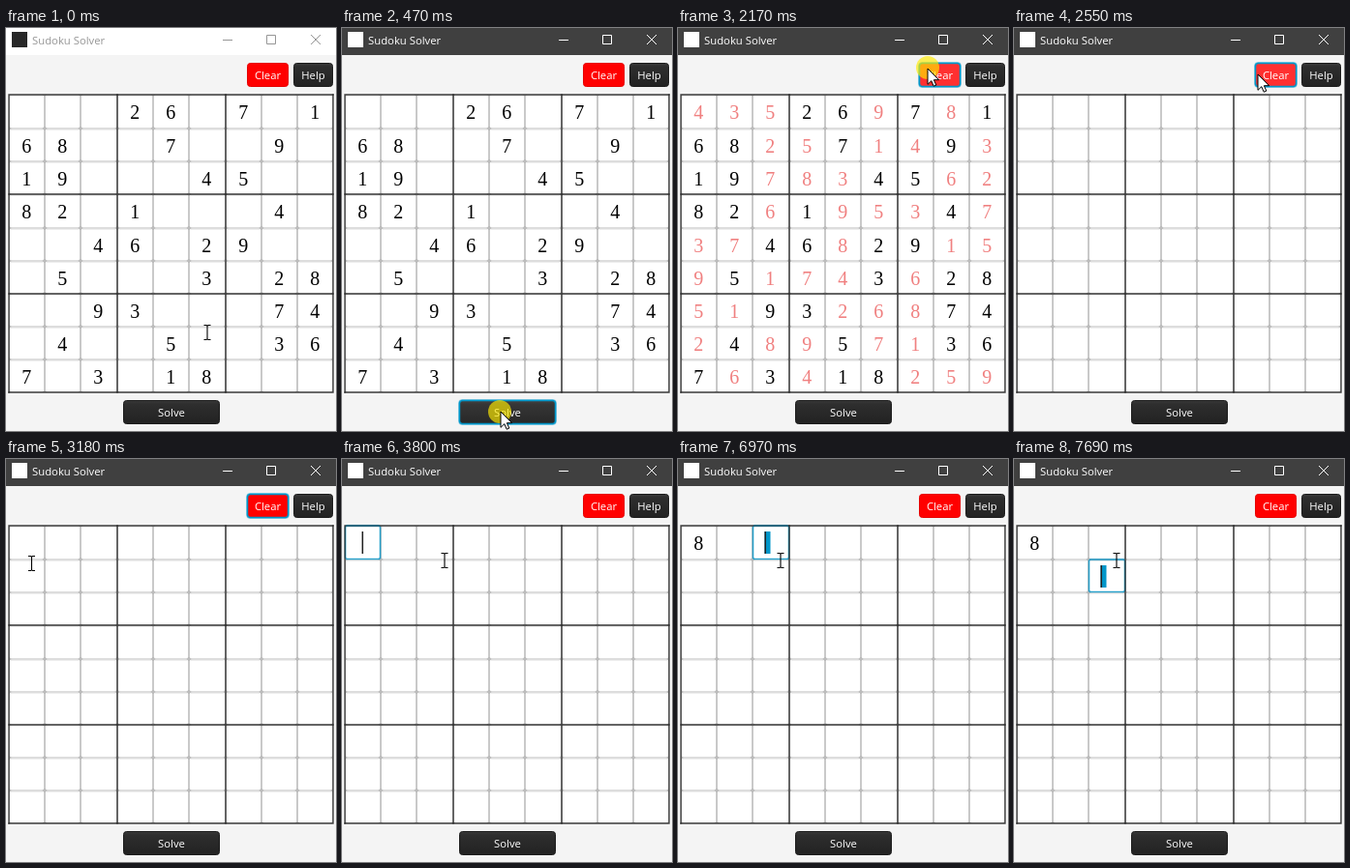
Recreate the animation shown at these times as an HTML page. Size 341 by 417 pixels, loop 8 s.

```html
<!DOCTYPE html>
<html lang="en">
<head>
<meta charset="utf-8">
<title>Sudoku Solver</title>
<style>
  html, body { margin: 0; width: 100%; height: 100%; overflow: hidden; background: #f4f4f4; }
  svg { display: block; width: 341px; height: 417px; }
  text { font: 11.3px "Open Sans", "Noto Sans", sans-serif; }
  .mid { text-anchor: middle; }
  .digit { font: 20px "Liberation Serif", serif; text-anchor: middle; }
</style>
</head>
<body>
<svg id="stage" viewBox="0 0 341 417" xmlns="http://www.w3.org/2000/svg">
  <defs>
    <linearGradient id="dark" x2="0" y2="1">
      <stop offset="0" stop-color="#3a3a3a"/><stop offset=".15" stop-color="#2e2e2e"/><stop offset="1" stop-color="#222"/>
    </linearGradient>
    <linearGradient id="lit" x2="0" y2="1">
      <stop offset="0" stop-color="#444"/><stop offset=".15" stop-color="#363636"/><stop offset="1" stop-color="#282828"/>
    </linearGradient>
  </defs>
</svg>
<script>
const LOOP = 8000, TICK = 77.5;
const COLS = [3, 40, 77, 115, 152, 189, 227, 264, 301, 338];
const ROWS = [69, 104, 138, 172, 207, 241, 275, 309, 343, 377];
const GIVEN = "...26.7.168..7..9.19...45..82.1...4...46.29...5...3.28..93...74.4..5..367.3.18...";
const SOLVED = "435269781682571493197834562826195347374682915951743628519326874248957136763418259";

// Pointer path: tick, x, y
const PATH = [
  [0, 208, 315], [1, 190, 352], [2, 164, 397], [13, 164, 397], [14, 167, 378], [15, 170, 358],
  [16, 176, 318], [18, 205, 205], [20, 242, 95], [22, 258, 42], [31, 258, 42], [33, 252, 48],
  [34, 222, 58], [36, 105, 92], [38, 27, 113], [39, 27, 113], [43, 26, 103], [47, 26, 103], [49, 106, 105]
];
// Button presses: start, end, x, y
const PRESSES = [[300, 700, 163, 397], [2170, 2400, 258, 41], [3500, 3650, 26, 101]];
// Focused cell: time, column, row
const FOCUS = [[3500, 0, 0], [6040, 1, 0], [6970, 2, 0], [7140, 0, 1], [7290, 1, 1], [7690, 2, 1]];
// Visible caret: start, end, offset from the cell's left line
const CARETS = [
  [3500, 4030, 18], [4490, 4970, 18], [5120, 5580, 13], [5810, 6040, 23],
  [6040, 6590, 13], [6970, LOOP, 13]
];

const stage = document.getElementById("stage");

function add(tag, attrs, parent = stage, text) {
  const el = document.createElementNS("http://www.w3.org/2000/svg", tag);
  set(el, attrs);
  if (text) el.textContent = text;
  parent.appendChild(el);
  return el;
}
function set(el, attrs) {
  for (const key in attrs) el.setAttribute(key, attrs[key]);
}
const show = (el, on) => set(el, { visibility: on ? "visible" : "hidden" });
const within = (t, a, b) => t >= a && t < b;
const mix = (a, b, p) => a + (b - a) * p;
const grey = v => `rgb(${v},${v},${v})`;

// Title bar
add("rect", { width: 341, height: 417, fill: "#f4f4f4" });
const bar = add("rect", { width: 341, height: 28 });
const icon = add("rect", { x: 6, y: 4, width: 16, height: 16 });
const title = add("text", { x: 27, y: 17 }, stage, "Sudoku Solver");
const controls = add("path", {
  d: "M224 12.5h10M269.5 7.5h9v9h-9zM315 7l10 10M325 7l-10 10", fill: "none", "stroke-width": 1
});

function makeButton(x, y, w, label, fill, hover) {
  const halo = add("rect", {
    x: x - .5, y: y - .5, width: w + 1, height: 26, rx: 3.5, fill: "none",
    stroke: "#0096c9", "stroke-width": 1, opacity: .45
  });
  const body = add("rect", { x: x + .5, y: y + .5, width: w - 1, height: 24, rx: 3 });
  add("text", { x: x + w / 2, y: y + 17, fill: "#fff", class: "mid" }, stage, label);
  return (focused, over) => {
    show(halo, focused);
    set(body, {
      fill: over ? hover : fill,
      stroke: focused ? "#0096c9" : fill === "#f00" ? "#e60000" : "#1c1c1c",
      "stroke-width": focused ? 1.5 : 1
    });
  };
}
const clear = makeButton(249, 36, 43, "Clear", "#f00", "#ff3030");
const help = makeButton(297, 36, 41, "Help", "url(#dark)", "url(#lit)");
const solve = makeButton(121, 385, 100, "Solve", "url(#dark)", "url(#lit)");
help(false, false);

// Board
add("rect", { x: 3, y: 69, width: 335, height: 308, fill: "#bcbcbc" });
for (let i = 0; i < 81; i++) {
  const x = COLS[i % 9], y = ROWS[i / 9 | 0];
  const w = COLS[i % 9 + 1] - x, h = ROWS[(i / 9 | 0) + 1] - y;
  add("rect", { x: x + .8, y: y + .5, width: w - 1.6, height: h - 1, rx: 2, fill: "#fff" });
  add("rect", { x: x + 2, y: y + 1, width: w - 4, height: 1, fill: "#eee" });
}
const ring = add("g", { fill: "none", stroke: "#0a96c8" });
const glow = add("rect", { "stroke-width": 2.4, opacity: .25, rx: 2 }, ring);
const edge = add("rect", { "stroke-width": 1.2, opacity: .8, rx: 2 }, ring);
for (const i of [0, 3, 6, 9]) {
  add("path", {
    d: `M${COLS[i]} 68.3V377.7M2.3 ${ROWS[i]}H338.7`, stroke: "#222", "stroke-width": 1.4, opacity: .85
  });
}
const topEdge = add("path", { stroke: "#0a86b4", "stroke-width": 1.2, opacity: .7 });

const block = add("rect", { width: 6, height: 23, fill: "#0096c9" });
const givens = add("g", { fill: "#000" });
const answers = add("g", { fill: "#f08080" });
function putDigit(i, value, parent) {
  add("text", { x: COLS[i % 9] + 18.2, y: ROWS[i / 9 | 0] + 24.6, class: "digit" }, parent, value);
}
[...SOLVED].forEach((value, i) => putDigit(i, value, GIVEN[i] === "." ? answers : givens));
const typed = add("g", { fill: "#000" });
putDigit(0, "8", typed);
const caret = add("rect", { width: 1.5, height: 23, fill: "#222" });

// Pointer
const spot = add("circle", { r: 12, fill: "#ffeb00", opacity: .66 });
const arrow = add("path", {
  d: "M0 0V16.3L3.8 12.7L6.2 18.2L8.8 17.1L6.4 11.7H11.6Z", fill: "#fff", stroke: "#000", "stroke-width": 1
});
const beam = add("path", {
  d: "M-3.5 -7.5H-1L0 -6.8L1 -7.5H3.5M0 -6.8V6.8M-3.5 7.5H-1L0 6.8L1 7.5H3.5",
  fill: "none", stroke: "#000", "stroke-width": 1.1
});

function pointerAt(t) {
  const n = Math.floor((t + 8) / TICK);
  const k = PATH.findIndex(p => p[0] > n);
  if (k < 0) return PATH[PATH.length - 1].slice(1);
  const [n0, x0, y0] = PATH[k - 1], [n1, x1, y1] = PATH[k];
  const p = (n - n0) / (n1 - n0);
  return [mix(x0, x1, p), mix(y0, y1, p)];
}

function render(t) {
  const active = t < 300 ? 0 : Math.min(1, (t - 220) / 240);
  set(bar, { fill: grey(Math.round(mix(255, 64, active))) });
  set(icon, { fill: grey(Math.round(mix(40, 255, active))) });
  const ink = grey(Math.round(mix(150, 255, active)));
  set(title, { fill: ink });
  set(controls, { stroke: ink });

  const [x, y] = pointerAt(t);
  const inBoard = y > 69 && y < 377;
  show(arrow, !inBoard);
  show(beam, inBoard);
  set(inBoard ? beam : arrow, { transform: `translate(${x} ${y})` });

  const press = PRESSES.find(p => within(t, p[0], p[1]));
  show(spot, press);
  if (press) set(spot, { cx: press[2], cy: press[3] });

  solve(within(t, 300, 2170), y > 385);
  clear(within(t, 2170, 3500), y < 61 && x > 249);

  show(givens, t < 2320);
  show(answers, within(t, 700, 2320));
  show(typed, t >= 5810);

  const focus = FOCUS.filter(f => f[0] <= t).pop();
  const mark = CARETS.find(c => within(t, c[0], c[1]));
  show(ring, focus);
  show(topEdge, focus);
  show(block, focus && t >= 6040);
  show(caret, focus && mark);
  if (!focus) return;
  const [, col, row] = focus, left = COLS[col], top = ROWS[row];
  const box = { x: left + .5, y: top, width: COLS[col + 1] - left - 1, height: ROWS[row + 1] - top - .5 };
  set(glow, box);
  set(edge, box);
  set(topEdge, { d: `M${left + 1} ${top}H${COLS[col + 1] - 1}` });
  set(block, { x: left + 12.5, y: top + 6 });
  if (mark) set(caret, { x: left + mark[2] - .5, y: top + 6 });
}

const start = performance.now();
function frame() {
  render((performance.now() - start) % LOOP);
  requestAnimationFrame(frame);
}
render(0);
requestAnimationFrame(frame);
</script>
</body>
</html>
```
